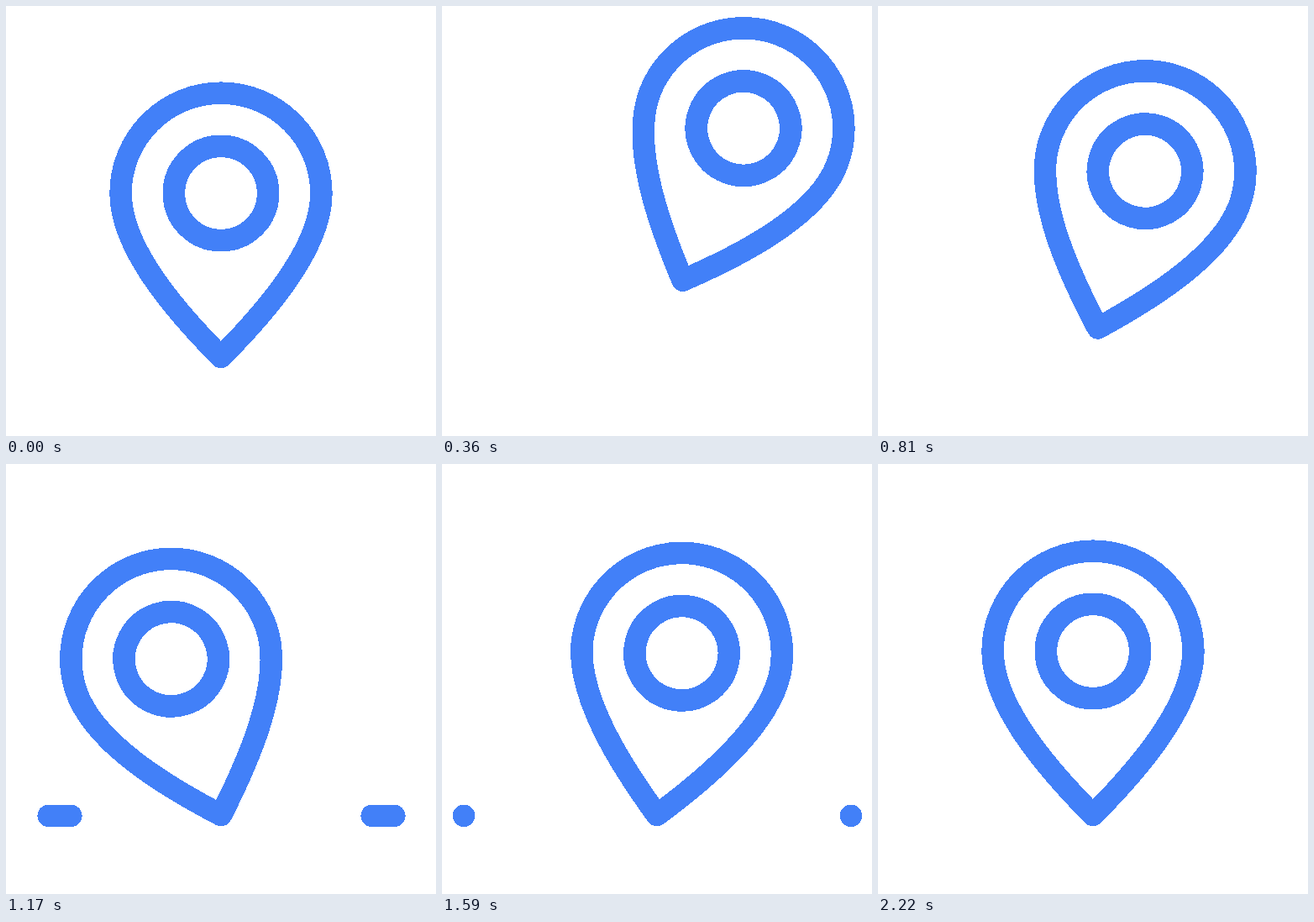
Recreate the animation shown at these times as an HTML page. Size 512 px wide and 512 px high, loop 4.46 s.

```html
<!DOCTYPE html>
<html lang="en">
<head>
<meta charset="utf-8">
<title>Location pin</title>
<style>
  html, body { margin: 0; width: 100%; height: 100%; overflow: hidden; background: #fff; }
  svg { display: block; width: 100%; height: 100%; shape-rendering: crispEdges; }
  g { fill: none; stroke: #4280f8; stroke-width: 26.5; stroke-linecap: round; stroke-linejoin: round; }
</style>
</head>
<body>
<svg viewBox="0 0 512 512">
  <g>
    <path id="dashes"/>
    <!-- the tip of the pin is the origin -->
    <g id="pin">
      <path d="M0 0C-50 -50.5 -119.4 -128 -119.4 -195A119.4 119.4 0 0 1 119.4 -195C119.4 -128 50 -50.5 0 0Z"/>
      <circle cy="-195" r="56.2"/>
    </g>
  </g>
</svg>
<script>
const LOOP = 4460, STEP = 30;
const pin = document.getElementById('pin');
const dashes = document.getElementById('dashes');

const clamp = v => Math.min(1, Math.max(0, v));
const span = (t, from, to) => clamp((t - from) / (to - from));

// Bezier easing with handles (x1, 0) and (x2, 1)
const ease = (x1, x2) => u => {
  let lo = 0, hi = 1, s = u;
  for (let i = 0; i < 24; i++) {
    s = (lo + hi) / 2;
    const x = 3 * (1 - s) ** 2 * s * x1 + 3 * (1 - s) * s * s * x2 + s ** 3;
    if (x < u) lo = s; else hi = s;
  }
  return s * s * (3 - 2 * s);
};
const launch = ease(0.15, 0.16), topple = ease(0.7, 0.53), sway = ease(0.33, 0.67);

// Lean of the pin: end time, angle, easing towards it
const leans = [
  [590, 24, launch],
  [1140, -18.2, topple],
  [1525, 10, sway],
  [1875, -4, sway],
  [2215, 0, sway]
];

function leanAt(t) {
  let start = 0, angle = 0;
  for (const [end, next, curve] of leans) {
    if (t < end) return angle + (next - angle) * curve(span(t, start, end));
    start = end;
    angle = next;
  }
  return angle;
}

const heightAt = t => t < 590 ? launch(t / 590) : 1 - span(t, 590, 868) ** 1.8;

function dashPath(t) {
  if (t < 890 || t > 1605) return '';
  const left = 1 - span(t, 890, 1600);
  const outer = 230.5 - 140 * left ** 3.46;
  const inner = 230.5 - 140 * left ** 2;
  return [-1, 1].map(side =>
    `M${256.5 + side * inner} 418.9L${256.5 + side * (outer + 0.01)} 418.9`).join('');
}

function draw(t) {
  const h = heightAt(t);
  const x = 256 + 36 * h ** 1.7, y = 418 - 100.5 * h;
  pin.setAttribute('transform', `translate(${x} ${y}) rotate(${leanAt(t)})`);
  dashes.setAttribute('d', dashPath(t));
}

const begin = performance.now();
function tick() {
  const t = (performance.now() - begin) % LOOP;
  draw(Math.floor(t / STEP) * STEP);
  requestAnimationFrame(tick);
}
tick();
</script>
</body>
</html>
```
